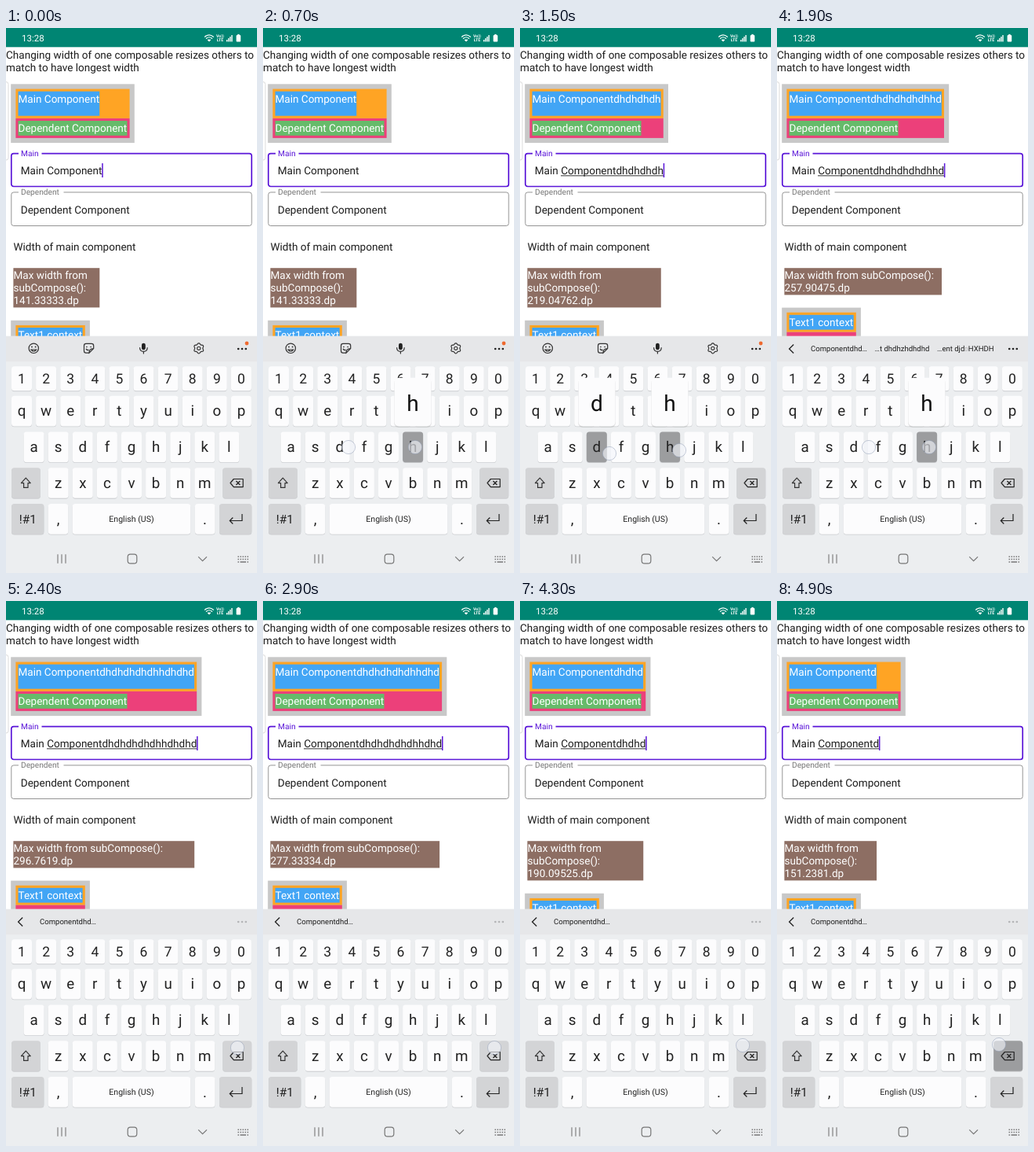
Animation, 320 px wide and 693 px high, one loop 5 s. Source, as an HTML page:

```html
<!DOCTYPE html>
<html lang="en">
<head>
<meta charset="utf-8">
<title>Dependent width demo</title>
<style>
  html, body { margin: 0; width: 100%; height: 100%; overflow: hidden; background: #fff; }
  svg { display: block; width: 100%; height: 100%; }
  text { font-family: Roboto, "Noto Sans", sans-serif; text-rendering: geometricPrecision; white-space: pre; }
</style>
</head>
<body>
<svg id="stage" viewBox="0 0 320 693" xmlns="http://www.w3.org/2000/svg"></svg>
<script>
const NS = 'http://www.w3.org/2000/svg';
const stage = document.getElementById('stage');
const LOOP = 5000, STEP = 100;
const BODY = 13.55;          // body text size
const UNIT = 320 / 1080;     // device pixel to stage pixel
const INK = '#1d1d1d', PURPLE = '#5a16d8', ORANGE = '#ffa424', PINK = '#ec407a';
const BLUE = '#42a5f5', GREEN = '#66bb6a', GREY = '#c8c8c8', BROWN = '#8d6e63';
const KEY = '#fcfcfd', SIDE = '#d3d4d6', DOWN = '#9c9d9f';

function el(name, attrs, parent = stage) {
  const node = document.createElementNS(NS, name);
  set(node, attrs);
  parent.appendChild(node);
  return node;
}
function set(node, attrs) {
  for (const k in attrs) node.setAttribute(k, attrs[k]);
}
const group = (parent = stage) => el('g', {}, parent);
const show = (node, on) => node.setAttribute('visibility', on ? 'visible' : 'hidden');
const rect = (x, y, width, height, fill, parent, more) =>
  el('rect', { x, y, width, height, fill, ...more }, parent);
const line = (d, stroke, width, parent, more) =>
  el('path', { d, stroke, 'stroke-width': width, fill: 'none', ...more }, parent);
const circle = (cx, cy, r, fill, parent, more) =>
  el('circle', { cx, cy, r, fill, ...more }, parent);
function label(str, x, y, size, fill, parent, more) {
  const node = el('text', { x, y, 'font-size': size, fill, ...more }, parent);
  node.textContent = str;
  return node;
}
const MID = { 'text-anchor': 'middle' };

// Page content
rect(0, 0, 320, 693, '#fff');
label('Changing width of one composable resizes others to', 0, 38.6, BODY, INK);
label('match to have longest width', 0, 54.6, BODY, INK);

const outer = rect(6.2, 71.3, 157.6, 74.8, GREY);
const mainBox = rect(12.4, 77.5, 145.2, 37.4, ORANGE);
const mainFill = rect(15.5, 80.6, 103.7, 31.1, BLUE);
const mainText = label('', 15.5, 95, BODY, '#fff');
const depBox = rect(12.4, 114.9, 145.2, 25, PINK);
rect(15.5, 118, 139, 18.8, GREEN);
label('Dependent Component', 15.5, 132.4, BODY, '#fff');

// Edge handle
rect(-8, 68.5, 11, 99.5, 'none', stage, { rx: 3, stroke: '#dcdcdc' });

function field(top, height, color, weight, name, nameColor, gap) {
  rect(6.8, top, 306.4, height, 'none', stage, { rx: 3, stroke: color, 'stroke-width': weight });
  rect(16, top - 2, gap, 4, '#fff');
  label(name, 19, top + 3.4, 10.2, nameColor);
}
field(159.6, 41.9, PURPLE, 1.7, 'Main', PURPLE, 29.5);
field(208.9, 42.6, '#949494', 1, 'Dependent', '#777', 57.5);
const input = label('', 18.8, 185.7, BODY, INK);
const underline = rect(52, 187.4, 0, 0.9, INK);
const caret = rect(122.4, 172, 1.5, 18, PURPLE);
label('Dependent Component', 18.8, 235.6, BODY, INK);
label('Width of main component', 9.5, 282.7, BODY, INK);

const brown = rect(9.4, 305.2, 109.9, 50.2, BROWN);
const brownLines = [0, 1, 2].map(i => label('', 9.5, 319.4 + i * 16, BODY, '#fff'));

const lower = group();
rect(6.2, 371.8, 100.7, 50, GREY, lower);
rect(12.4, 377.9, 88.4, 25, ORANGE, lower);
rect(15.5, 381, 82.2, 18.8, BLUE, lower);
label('Text1 context', 15.5, 395.3, BODY, '#fff', lower);
rect(12.4, 402.9, 88.4, 25, PINK, lower);

// Status bar
rect(0, 0, 320, 24.3, '#008573');
label('13:28', 20, 17, 11.5, '#fff');
const white = { 'stroke-linecap': 'round' };
line('M253.5 11.2Q259 6.4 264.5 11.2M255.4 13.3Q259 10.2 262.6 13.3', '#fff', 1.2, stage, white);
line('M257.2 15L259 17L260.8 15Z', '#fff', 1, stage, { fill: '#fff' });
label('Vo))', 273, 12, 5.2, '#fff', stage, { ...MID, 'font-weight': 700 });
label('LTE', 273, 17.4, 5.2, '#fff', stage, { ...MID, 'font-weight': 700 });
for (let i = 0; i < 4; i++) rect(281 + i * 2.1, 15 - i * 2, 1.4, 2.4 + i * 2, '#fff');
rect(293.6, 9, 5.6, 8.6, '#fff', stage, { rx: 1 });
rect(295.2, 7.9, 2.4, 1.4, '#fff');

// Keyboard
rect(0, 391.8, 320, 301.2, '#eceef0');
rect(0, 391.8, 320, 32.4, '#e6e7e9');

const tools = group();
const toolLine = (d, more) => line(d, '#333', 1.2, tools, { 'stroke-linecap': 'round', ...more });
circle(35.3, 407.3, 6.2, 'none', tools, { stroke: '#333', 'stroke-width': 1.2 });
circle(33, 405.5, 0.9, '#333', tools);
circle(37.6, 405.5, 0.9, '#333', tools);
toolLine('M32 409Q35.3 413 38.6 409Z');
toolLine('M106 413.2H102Q99.5 413.2 99.5 410.5V404Q99.5 401.4 102 401.4H109Q111.7 401.4 111.7 404V407.5L106 413.2Q105.6 408 111.7 407.5');
toolLine('M102.8 405.4H103M108 405.4H108.2M102.4 408.3Q103.5 410 105 409.5', { 'stroke-width': 1.5 });
rect(173, 400.7, 4.8, 8.6, '#222', tools, { rx: 2.4 });
toolLine('M170.6 406.5Q170.6 411.3 175.4 411.3Q180.2 411.3 180.2 406.5M175.4 411.3V414');
circle(245.8, 407.3, 2.1, 'none', tools, { stroke: '#333', 'stroke-width': 1.1 });
let gear = '';
for (let i = 0; i <= 72; i++) {
  const a = i * Math.PI / 36, r = 5.8 + 0.75 * Math.cos(6 * a);
  gear += (i ? 'L' : 'M') + (245.8 + r * Math.sin(a)).toFixed(2) + ' ' + (407.3 - r * Math.cos(a)).toFixed(2);
}
toolLine(gear + 'Z');
circle(307, 401, 2.4, '#ee6a30', tools);

const hints = group();
line('M21.2 402.5L15.6 408L21.2 413.5', '#222', 1.3, hints);
label('Componentdhd…', 43, 411.3, 9.55, INK, hints);
const extraHints = group(hints);
label('…t dhdhzhdhdhd', 124.5, 411.3, 9.55, INK, extraHints);
const lastHint = label('…ent djd', 204, 411.3, 9.55, INK, extraHints);
for (const [str, fill] of [['D', '#b0b0b0'], ['HXHDH', INK]]) {
  const part = el('tspan', { fill, 'font-size': fill === INK ? 9.55 : 7 }, lastHint);
  part.textContent = str;
}
const dots = [296.2, 301, 305.8].map(x => circle(x, 408, 1.35, '#222'));

const keys = {};
function key(x, y, w, h, fill = KEY) {
  rect(x, y + 0.9, w, h, '#cbcdd0', stage, { rx: 3.6 });
  return rect(x, y, w, h, fill, stage, { rx: 3.6 });
}
function keyRow(chars, x, y, h, size, base) {
  [...chars].forEach((c, i) => {
    const left = x + i * 31.1;
    keys[c] = key(left, y, 26, h);
    label(c, left + 13, base, size, '#222', stage, MID);
  });
}
keyRow('1234567890', 7, 430.3, 31, 17.5, 452.4);
keyRow('qwertyuiop', 7, 467.8, 38.6, 18.8, 493);
keyRow('asdfghjkl', 22.6, 513.6, 38.6, 18.8, 539);
keyRow('zxcvbnm', 53.7, 559.2, 38.6, 18.8, 584.8);
key(7, 559.2, 37, 38.6, SIDE);
line('M25.3 572.2L31.2 578.6H28V584.4H22.6V578.6H19.4Z', '#333', 1.2, stage, { 'stroke-linejoin': 'round' });
const erase = key(276.2, 559.2, 37, 38.6, SIDE);
line('M290.3 573.5H302.2V583.6H290.3L286 578.5ZM293.4 576L298.4 581M298.4 576L293.4 581', '#222', 1.2, stage, { 'stroke-linejoin': 'round' });
key(7, 604.9, 41.4, 38.8, SIDE);
label('!#1', 27.8, 630, 15.4, '#222', stage, MID);
key(53.7, 604.9, 25.6, 38.8);
label(',', 66.6, 631, 18.8, '#222', stage, MID);
key(84.7, 604.9, 150.6, 38.8);
label('English (US)', 160, 628.4, 10.6, '#222', stage, MID);
key(240.9, 604.9, 25.6, 38.8);
label('.', 253.5, 631, 18.8, '#222', stage, MID);
key(272, 604.9, 41.3, 38.8, SIDE);
line('M301 618V626.5H285.5M289.3 622.5L285.3 626.5L289.3 630.5', '#222', 1.2);

// Navigation bar
line('M66 669.3V680.7M71 669.3V680.7M76 669.3V680.7', '#777', 1.1);
rect(155.2, 669.2, 11.6, 11.6, 'none', stage, { rx: 3.4, stroke: '#777', 'stroke-width': 1.2 });
line('M245.2 672.3L250.6 677.7L256 672.3', '#777', 1.2);
line('M295.5 672.2H309M295.5 675.6H309', '#777', 1.5, stage, { 'stroke-dasharray': '1.5 1.5' });
line('M295.5 679H297M298.5 679H306M307.5 679H309', '#777', 1.5);

// Key previews and touch points
function preview(c, x) {
  const g = group();
  rect(x - 24, 446, 48, 62, '#000', g, { rx: 6, opacity: 0.1 });
  rect(x - 23.6, 444.8, 47.2, 61.8, KEY, g, { rx: 6 });
  label(c, x, 486.6, 28, '#111', g, MID);
  return g;
}
const previews = { d: preview('d', 98), h: preview('h', 191) };

// Each touch: visible span and waypoints [time, x, y]
const touches = [
  { from: 400, to: 2400, path: [[700, 109, 533], [1500, 114, 541], [1900, 117, 533]] },
  { from: 600, to: 2400, path: [[700, 194, 533], [1500, 203, 537], [1900, 194, 533]] },
  { from: 2400, to: LOOP, path: [[2900, 295, 568], [3700, 285, 566], [4900, 283, 564]] }
].map(touch => ({
  ...touch,
  node: circle(0, 0, 8.6, '#f4f6fb', stage, { 'fill-opacity': 0.62, stroke: '#8f9cb4', 'stroke-opacity': 0.55, 'stroke-width': 0.9 })
}));

function along(path, t) {
  if (t <= path[0][0]) return path[0].slice(1);
  for (let i = 1; i < path.length; i++) {
    const [t0, x0, y0] = path[i - 1], [t1, x1, y1] = path[i];
    if (t <= t1) {
      const k = (t - t0) / (t1 - t0);
      return [x0 + (x1 - x0) * k, y0 + (y1 - y0) * k];
    }
  }
  return path[path.length - 1].slice(1);
}

const TYPED = 'dhdhdhdhdhhdhdhd';
const FIRST = 700, ERASE = 2850;

function typedCount(t) {
  if (t < 2400) return Math.min(TYPED.length, Math.max(0, (t - FIRST) / STEP));
  return Math.min(TYPED.length, 14 - Math.floor((t - ERASE) / 150));
}

function pressedKeys(t, n) {
  if (t < 600 || t >= 2300) return '';
  if (t === 600) return 'd';
  if (t === FIRST) return 'h';
  return TYPED[n] + (n % 3 === 2 ? TYPED[n - 1] : '');
}

function render(t) {
  const n = typedCount(t);
  const tail = TYPED.slice(0, n);
  const px = [...tail].reduce((sum, c) => sum + (c === 'd' ? 26 : 25), 371);
  const w = px * UNIT, full = Math.max(145.2, w);
  const str = 'Main Component' + tail;

  set(outer, { width: full + 12.4 });
  set(mainBox, { width: full });
  set(depBox, { width: full });
  set(mainFill, { width: w - 6.2 });
  mainText.textContent = input.textContent = str;

  const end = 18.8 + w - 6.2;
  set(caret, { x: end - 0.3 });
  show(caret, t < 400 || t >= 800);
  set(underline, { width: end - 52 });
  show(underline, n > 0);

  const dp = Number(Math.fround(px / 2.625).toPrecision(8)) + '.dp';
  const wide = n >= 11;
  const lines = wide ? ['Max width from subCompose():', dp, ''] : ['Max width from', 'subCompose():', dp];
  lines.forEach((s, i) => { brownLines[i].textContent = s; });
  set(brown, { width: w, height: wide ? 34.2 : 50.2 });
  set(lower, { transform: `translate(0 ${wide ? -16.2 : 0})` });

  const suggesting = t >= 1700;
  show(tools, !suggesting);
  show(hints, suggesting);
  set(extraHints, { display: t < 2400 ? 'inline' : 'none' });
  dots.forEach(d => set(d, { fill: t < 2400 ? '#222' : '#b4b5b7' }));

  const held = pressedKeys(t, n);
  for (const c of 'dh') {
    set(keys[c], { fill: held.includes(c) ? DOWN : KEY });
    show(previews[c], held.includes(c));
  }
  const erasing = t >= 2500 && (t / STEP % 2 === 0 || t >= 4800);
  set(erase, { fill: erasing ? DOWN : SIDE });

  for (const { from, to, path, node } of touches) {
    const [cx, cy] = along(path, t);
    set(node, { cx, cy });
    show(node, t >= from && t < to);
  }
}

const start = performance.now();
let last = -1;
function tick() {
  const t = Math.floor((performance.now() - start) % LOOP / STEP) * STEP;
  if (t !== last) render(last = t);
  requestAnimationFrame(tick);
}
tick();
</script>
</body>
</html>
```
